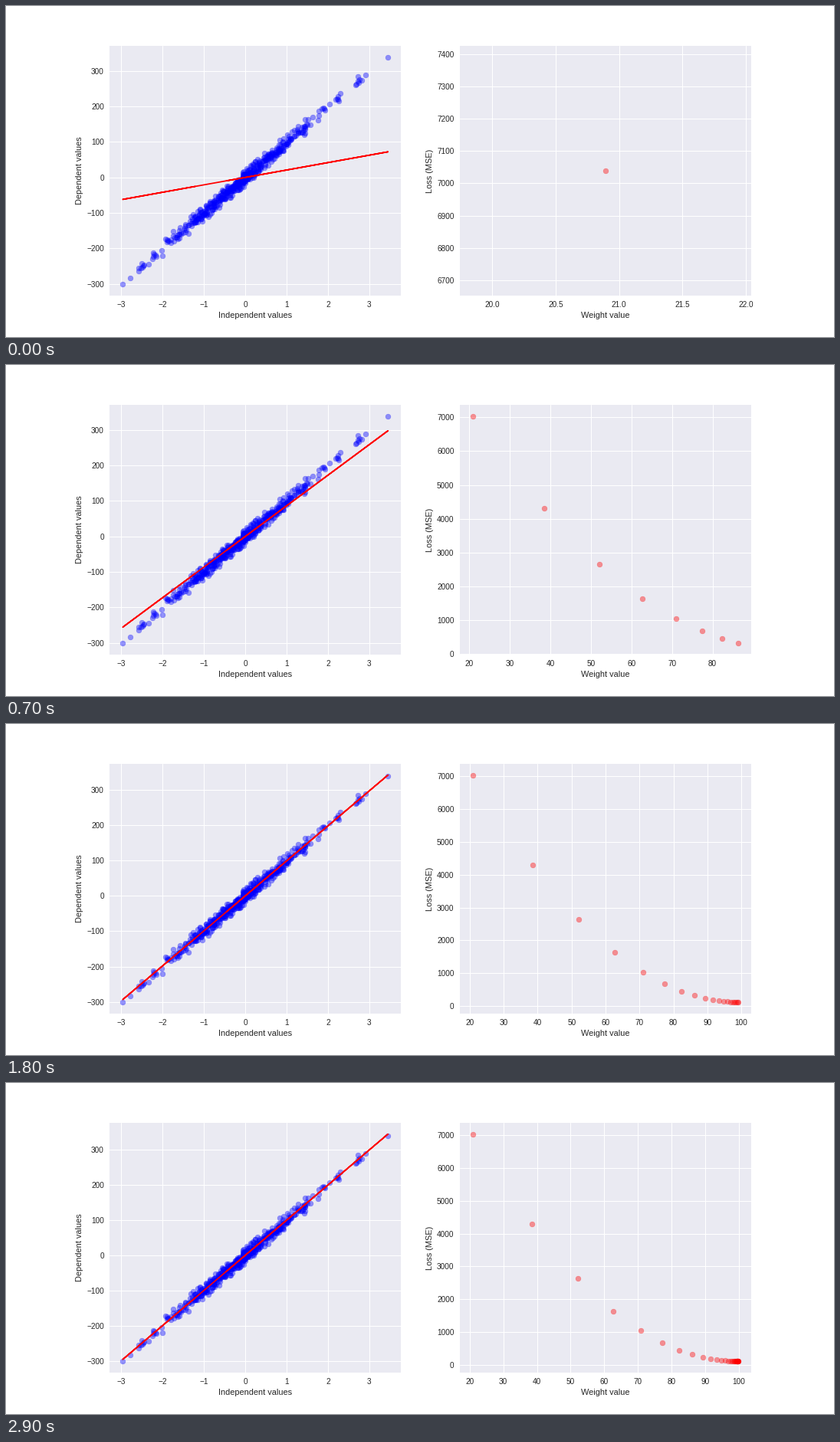
These frames come from a looping animation (1080 by 432 pixels, 3000 ms). A matplotlib script:

```python
import numpy as np
import matplotlib.pyplot as plt
from matplotlib.animation import FuncAnimation

FRAMES, INTERVAL = 30, 100
FINAL_WEIGHT, FIRST_WEIGHT = 99.85, 20.892
MEAN_SQUARE_X, NOISE_LOSS, LEARNING_RATE = 1.1115, 109.6, 0.1

plt.rcParams.update({
    "font.family": "sans-serif",
    "font.sans-serif": ["Liberation Sans", "DejaVu Sans"],
    "figure.facecolor": "white",
    "text.color": ".15",
    "axes.axisbelow": True,
    "axes.edgecolor": "white",
    "axes.facecolor": "#EAEAF2",
    "axes.grid": True,
    "axes.labelcolor": ".15",
    "axes.labelsize": 11,
    "axes.linewidth": 0,
    "grid.color": "white",
    "grid.linestyle": "-",
    "grid.linewidth": 1,
    "lines.linewidth": 1.75,
    "lines.markersize": 7,
    "lines.markeredgewidth": 0,
    "lines.solid_capstyle": "round",
    "patch.linewidth": 0.3,
})
for axis in ("xtick", "ytick"):
    plt.rcParams.update({
        f"{axis}.color": ".15",
        f"{axis}.labelsize": 10,
        f"{axis}.major.size": 0,
        f"{axis}.minor.size": 0,
        f"{axis}.major.pad": 7,
    })


def make_data():
    """Noisy line: a normal core, thin tails and four fixed end points."""
    rng = np.random.default_rng(7)
    core = rng.normal(0, 0.95, 600)
    core = core[np.abs(core) < 2.05][:475]
    tails = [rng.normal(centre, 0.06, 7) for centre in (-2.48, -2.2, 2.2, 2.7)]
    x = np.concatenate([core, *tails])
    y = FINAL_WEIGHT * x + np.clip(rng.normal(0, 10, x.size), -22, 22)
    ends = [(-2.965, -301.2), (-2.79, -284), (2.91, 289), (3.453, 339.3)]
    return rng.permutation(np.vstack([np.column_stack([x, y]), ends])).T


x, y = make_data()

# Gradient descent on a parabola shrinks the error by a constant factor.
decay = 1 - 2 * LEARNING_RATE * MEAN_SQUARE_X
errors = (FINAL_WEIGHT - FIRST_WEIGHT) * decay ** np.arange(FRAMES)
weights = FINAL_WEIGHT - errors
losses = NOISE_LOSS + MEAN_SQUARE_X * errors ** 2

fig, (fit_ax, loss_ax) = plt.subplots(1, 2, figsize=(15, 6), dpi=72)
fig.subplots_adjust(left=0.125, right=0.9, bottom=0.125, top=0.88, wspace=0.2)


def draw(step):
    fit_ax.clear()
    fit_ax.scatter(x, y, color="blue", alpha=0.4)
    fit_ax.plot(x, weights[step] * x, color="red")
    fit_ax.set(xlabel="Independent values", ylabel="Dependent values")

    loss_ax.clear()
    loss_ax.scatter(weights[:step + 1], losses[:step + 1], color="red", alpha=0.4)
    loss_ax.set(xlabel="Weight value", ylabel="Loss (MSE)")


anim = FuncAnimation(fig, draw, frames=FRAMES, interval=INTERVAL,
                     init_func=lambda: None, repeat=True, repeat_delay=0)
plt.show()
```
